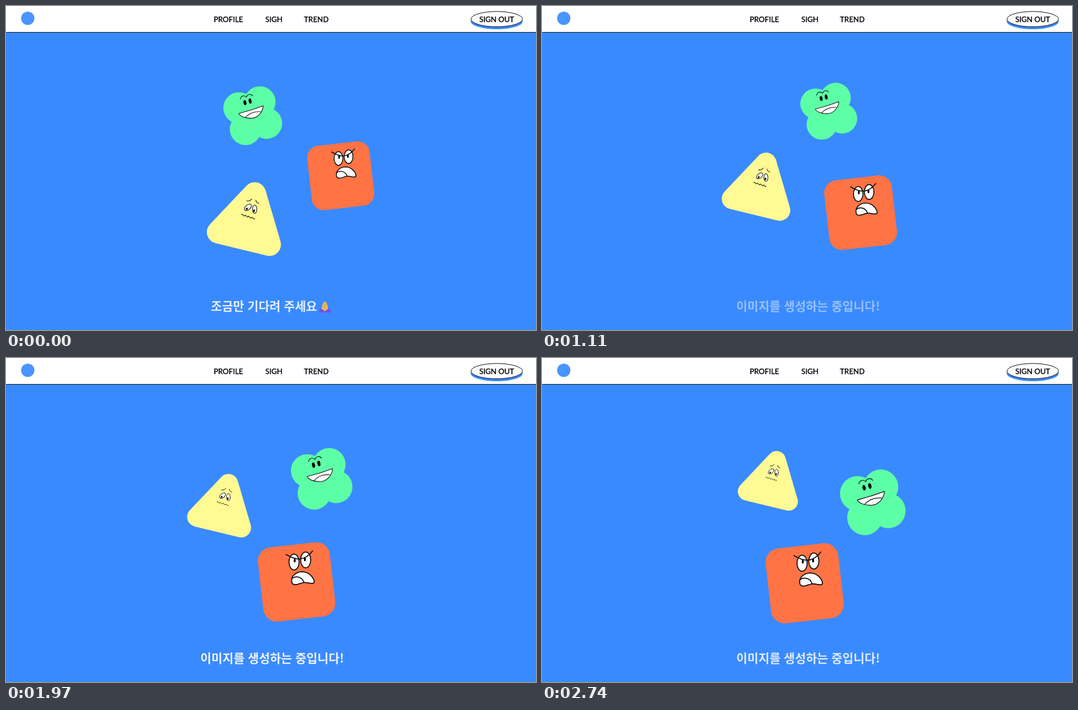
Animation, 958 px wide and 585 px high, one loop 2.81 s. Source, as an HTML page:

```html
<!DOCTYPE html>
<html lang="ko">
<head>
<meta charset="utf-8">
<title>Loading</title>
<style>
  html, body { margin: 0; width: 100%; height: 100%; overflow: hidden; background: #3a8aff; }
  svg { display: block; width: 958px; height: 585px; }
  .nav { font: 500 13.4px Lato, sans-serif; text-anchor: middle; stroke: #000; stroke-width: .25px; }
  .msg { font: 700 21.7px "Noto Sans CJK KR", "Noto Sans CJK JP", "Noto Sans CJK", sans-serif; fill: #fff; }
  .ink { fill: none; stroke: #0b0b0b; stroke-linecap: round; stroke-linejoin: round; }
  .white { fill: #fff; }
</style>
</head>
<body>
<svg viewBox="0 0 958 585">
  <rect width="958" height="585" fill="#3a8aff"/>
  <rect width="958" height="47" fill="#fff"/>
  <rect y="47" width="958" height="1" fill="#111"/>
  <circle cx="39.3" cy="22.3" r="12" fill="#4a94ff"/>
  <g class="nav">
    <text x="402" y="28.8">PROFILE</text>
    <text x="484.2" y="28.8">SIGH</text>
    <text x="560.8" y="28.8">TREND</text>
    <ellipse cx="887" cy="27.8" rx="47" ry="14.2" fill="#3a8aff" stroke="none"/>
    <ellipse cx="887" cy="23.7" rx="46.5" ry="13.8" fill="#fff" stroke-width="1"/>
    <text x="887" y="28.8">SIGN OUT</text>
  </g>

  <g id="happy">
    <g fill="#5dffa6">
      <circle cx="612.2" cy="232" r="31.6"/>
      <circle cx="570" cy="244" r="31.6"/>
      <circle cx="625.6" cy="275" r="31.5"/>
      <circle cx="583.2" cy="287.2" r="31.8"/>
      <circle cx="597.5" cy="259.500" r="14"/>
    </g>
    <g class="ink" stroke-width="1.2">
      <path d="M572.5 226.5C574 220 580 217.5 585 222.5C587 216.5 593.5 214.5 597.5 220"/>
      <path class="white" d="M569.8 255.300Q594 249.300 618.8 240C618 252.600 608 263.600 597 264.800C585 265.500 572.600 262 569.8 255.300Z"/>
      <path d="M583 263.400C590 254.800 602 250.800 613.5 251.800"/>
    </g>
    <ellipse cx="582" cy="233.4" rx="2.9" ry="5.1" transform="rotate(-12 582 233.4)"/>
    <ellipse cx="592.4" cy="230.2" rx="2.9" ry="5.3" transform="rotate(-12 592.4 230.2)"/>
  </g>

  <g id="angry">
    <rect x="440.900" y="339.500" width="133.2" height="137" rx="25" fill="#ff7345" transform="rotate(-6.5 507.500 408)"/>
    <g class="ink" stroke-width="1.8">
      <ellipse class="white" cx="502.8" cy="371.5" rx="9.3" ry="14.5"/>
      <ellipse class="white" cx="524.2" cy="367.5" rx="9.3" ry="14.5"/>
      <path d="M488 357.5C497 363 504 366 513 366C523 365 531 359 537 351"/>
      <path class="white" d="M498.500 406.500C497.500 396 507.500 389.500 517.500 389.200C530.500 389.200 539.500 400.500 540 408.500C537.500 413.500 528.500 408.500 521.500 409C514.500 409.500 510.500 413.500 503.500 413C499.500 412.500 498.500 409.500 498.500 406.500Z"/>
      <path d="M499 401.500C505.500 396.500 517.500 397.500 521 409"/>
    </g>
    <ellipse cx="504" cy="368.5" rx="1.8" ry="3.6"/>
    <ellipse cx="522.8" cy="366.5" rx="1.8" ry="3.6"/>
  </g>

  <g id="worried">
    <path d="M449.5 338.5L383.5 408L476.5 430.5Z" fill="#fffa94" stroke="#fffa94" stroke-width="41" stroke-linejoin="round"/>
    <g class="ink" stroke-width="1.1">
      <path d="M435 351.5Q441.500 352.500 444 348M451.500 350Q452 355 457 356"/>
      <ellipse class="white" cx="437.2" cy="363.4" rx="7.4" ry="4.3" transform="rotate(-41 437.2 363.4)"/>
      <ellipse class="white" cx="449.4" cy="366.6" rx="3.9" ry="7.6"/>
      <path d="M425.500 376.500q1.200 -1.800 3 .9t3 .9t3 .9t3 .9t3 .9t3 .9t3 .9t3 .9"/>
    </g>
    <ellipse cx="435.2" cy="366" rx="2.2" ry="1.6" transform="rotate(-41 435.2 366)"/>
    <ellipse cx="448.4" cy="369.4" rx="1.5" ry="2.6"/>
  </g>

  <g id="wait">
    <text class="msg" x="370.5" y="550">조금만 기다려 주세요</text>
    <path d="M566 553.500V548.500L571 545.500L576.300 551L581.500 545.500L587 548.500V553.500H578.500L576.300 551.500L574 553.500Z" fill="#7a45f0"/>
    <path d="M576.300 551.200L570.300 546.800L571.700 540.500L574 534.500Q575.500 532.700 576.300 534.500Q577.200 532.700 578.700 534.500L581 540.500L582.300 546.800Z" fill="#ffc23c"/>
    <path d="M576.300 535V550" stroke="#e59a2b" stroke-width=".8"/>
  </g>
  <text id="making" class="msg" x="481.2" y="550" text-anchor="middle">이미지를 생성하는 중입니다!</text>
</svg>
<script>
const LOOP = 2810, FPS = 15;
const CENTER = { x: 494, y: 298 }, RADIUS = 110.6;
const SPEED = 36, START = -25.6;   // degrees per second, degrees past the top
const $ = id => document.getElementById(id);

// x, y, size: the middle and scale at which each figure is drawn; dx, dy: shift off the orbit
const figures = [
  { el: $('happy'), lag: 0, x: 598, y: 260, size: 1.196, dx: 0, dy: 0 },
  { el: $('angry'), lag: 120, x: 507, y: 408, size: 1.482, dx: .3, dy: 0 },
  { el: $('worried'), lag: 240, x: 430, y: 384.5, size: 1.404, dx: -1.5, dy: -4.5 }
];

// Opacity keys: [step, value]
const fades = [
  { el: $('wait'), keys: [[0, .87], [4, 1], [8, 1], [11, .72], [16, .05], [17, 0]] },
  { el: $('making'), keys: [[9, 0], [11, .08], [16, .45], [24, .8], [33, 1], [36, 1], [40, .83]] }
];

// The picture advances in 15 fps steps, held for slightly uneven times
function stepAt(ms) {
  if (ms < 480) return Math.floor(ms * 7 / 480);
  if (ms < 1130) return 7 + Math.floor((ms - 480) / 70);
  return 17 + Math.floor((ms - 1130) / 70);
}

function valueAt(keys, n) {
  if (n <= keys[0][0]) return keys[0][1];
  for (let i = 1; i < keys.length; i++) {
    const [a, u] = keys[i - 1], [b, v] = keys[i];
    if (n <= b) return u + (v - u) * (n - a) / (b - a);
  }
  return keys[keys.length - 1][1];
}

function draw(ms) {
  const n = stepAt(ms);
  for (const f of figures) {
    const turn = (START + f.lag + SPEED * n / FPS + 360) % 360;
    const a = turn * Math.PI / 180;
    const scale = 1 + .5 * Math.min(turn, 360 - turn) / 180;
    const x = CENTER.x + RADIUS * Math.sin(a) + f.dx;
    const y = CENTER.y - RADIUS * Math.cos(a) + f.dy;
    f.el.setAttribute('transform',
      `translate(${x} ${y}) scale(${scale / f.size}) translate(${-f.x} ${-f.y})`);
  }
  for (const f of fades) f.el.setAttribute('opacity', valueAt(f.keys, n));
}

function tick() {
  draw(performance.now() % LOOP);
  requestAnimationFrame(tick);
}
tick();
</script>
</body>
</html>
```
